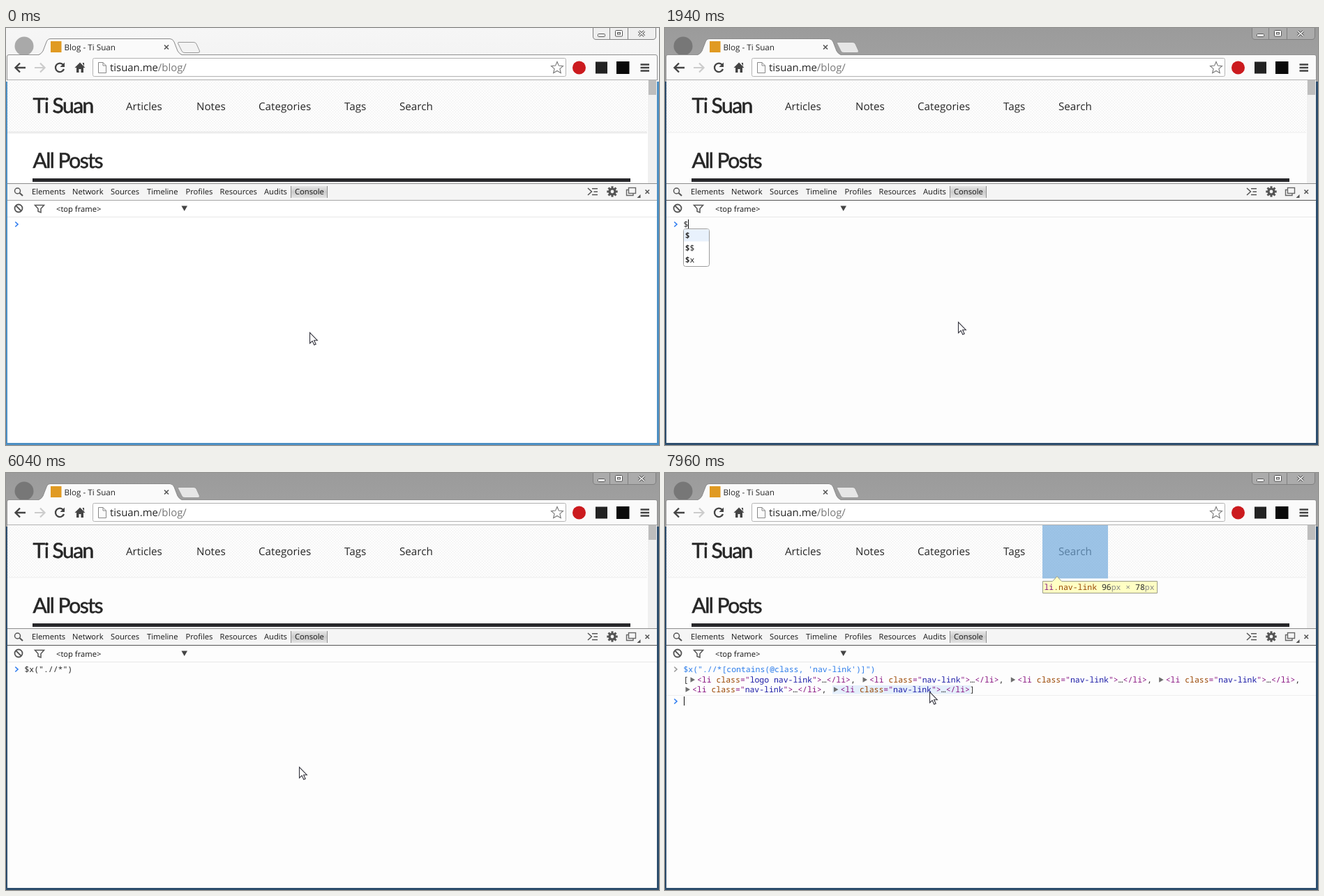
An HTML page that plays this animation: 936x599 px, repeating every 8 s.

```html
<!DOCTYPE html>
<html lang="en">
<head>
<meta charset="utf-8">
<title>Console demo</title>
<style>
html, body { margin: 0; width: 100%; height: 100%; overflow: hidden; }
svg {
  display: block; width: 100%; height: 100%;
  --bar1: #f6f6f6; --bar2: #f1f1f1; --frame: #4c8fc4; --page: #fff;
  --newtab: #f3f3f3; --badge: #a9a9a9; --rule: #a6a6a6; --btn: #efefef; --edge: 3px;
}
svg.focus {
  --bar1: #9b9b9b; --bar2: #a3a3a3; --frame: #2c4d6d; --page: #fdfdfd;
  --newtab: #e6e6e6; --badge: #777; --rule: #555; --btn: #ababab; --edge: 1px;
}
text { font-family: "Open Sans", "Noto Sans", sans-serif; fill: #262626; white-space: pre; text-rendering: geometricPrecision; }
.ui { font-size: 11.2px; fill: #161616; }
.tab { font-size: 11.7px; }
.url { font-size: 14.9px; }
.nav { font-size: 15.2px; }
.head { font: 30px Lato, "Open Sans", sans-serif; letter-spacing: -1.5px; stroke: #262626; stroke-width: .6px; }
.code { font: 11.46px "Noto Sans Mono", "DejaVu Sans Mono", monospace; }
.tag { fill: #881280; } .attr { fill: #994500; } .val { fill: #1a1aa6; } .dim { fill: #888; } .echo { fill: #2b7cea; }
.line { fill: none; stroke: #555; stroke-width: 1.5px; }
</style>
</head>
<body>
<svg id="stage" viewBox="0 0 936 599" preserveAspectRatio="none"></svg>
<script>
const svg = document.getElementById('stage');
const LOOP = 8000, CELL = 6.876;
const esc = s => s.replace(/&/g, '&amp;').replace(/</g, '&lt;');
const text = (x, y, cls, s) => `<text x="${x}" y="${y}" class="${cls}">${esc(s)}</text>`;
const rect = (x, y, w, h, fill, more = '') => `<rect x="${x}" y="${y}" width="${w}" height="${h}" fill="${fill}" ${more}/>`;
const path = (d, more = 'class="line"') => `<path d="${d}" ${more}/>`;
const solid = c => `fill="${c}"`;
const outline = (c, w = 1, fill = 'none') => `fill="${fill}" stroke="${c}" stroke-width="${w}"`;
const span = (cls, s) => `<tspan class="${cls}">${esc(s)}</tspan>`;

// One collapsed element in the console result
function node(x, y, name, tail) {
  return path(`M${x + 3.5} ${y - 7.8}l6.5 3.8l-6.5 3.8z`, solid('#6e6e6e')) +
    `<text x="${x + 13}" y="${y}" class="code">` + span('tag', '<li ') + span('attr', 'class') +
    span('tag', '="') + span('val', name) + span('tag', '">') + '…' + span('tag', '</li>') + tail + '</text>';
}

const defs = `<defs>
  <linearGradient id="bar" x2="0" y2="1"><stop stop-color="var(--bar1)"/><stop offset="1" stop-color="var(--bar2)"/></linearGradient>
  <linearGradient id="press" x2="0" y2="1"><stop stop-color="#e6e6e6"/><stop offset=".5" stop-color="#cbcbcb"/><stop offset="1" stop-color="#e3e3e3"/></linearGradient>
  <pattern id="dots" width="4" height="4" patternUnits="userSpaceOnUse">
    <rect width="4" height="4" fill="#fcfcfc"/><path d="M0 0h1v1h-1zM2 2h1v1h-1z" fill="#ebebeb"/>
  </pattern></defs>`;

const windowFrame =
  rect(0, 0, 936, 78, 'url(#bar)') + rect(0, 77, 936, 522, 'var(--frame)') +
  path('M841.5 0V12Q841.5 16.5 846 16.5H927Q931.5 16.5 931.5 12V0M865.5 0V16M891.5 0V16', outline('#7f7f7f', 1, 'var(--btn)')) +
  rect(848.5, 8.5, 10, 4, '#fff', 'rx="1" stroke="#555"') +
  rect(873.5, 3.5, 10, 8.5, '#fff', 'rx="1" stroke="#555"') + rect(876.5, 6.5, 4, 2.5, '#ddd', 'stroke="#555"') +
  path('M907 4.5L915 11.5M915 4.5L907 11.5', outline('#555', 3.4)) + path('M907 4.5L915 11.5M915 4.5L907 11.5', outline('#fff', 1.5)) +
  `<circle cx="26" cy="26" r="13.5" fill="var(--badge)"/>` +
  path('M247 20.5H269Q272 20.5 273 23L277.5 33Q278 35.5 275 35.5H256Q253 35.5 252 33L246.5 22Z', outline('#999', 1, 'var(--newtab)')) +
  rect(2, 39, 931, 36, '#fafafa') + path('M1.5 75V41Q1.5 38.5 4 38.5H931Q933.5 38.5 933.5 41V75', outline('#909090')) +
  path('M46 39Q51 37 53 33L58 20Q59.5 15.5 64 15.5H235Q239 15.5 241 20L246 33Q248 37 253 39', outline('#8a8a8a', 1, '#fafafa')) +
  rect(46, 39, 207, 2, '#fafafa') +
  rect(64, 19, 15.5, 16, '#e09a22') +
  text(83.5, 32, 'tab', 'Blog - Ti Suan') +
  path('M227 24.5L233 30.5M233 24.5L227 30.5', outline('#555', 1.6));

const toolbar =
  path('M28 57H14M20 50.5L13.5 57L20 63.5', outline('#444', 2.4)) +
  path('M41 57H55M49 50.5L55.5 57L49 63.5', outline('#ccc', 2.2)) +
  path('M82 53A6.2 6.2 0 1 0 83 59', outline('#444', 2.3)) + path('M84 49.5V56H77.5Z', solid('#444')) +
  path('M98.5 57L106 49.5L113.5 57H111V64H107.5V59H104.5V64H101V57ZM109.5 50H112V55Z', solid('#444')) +
  rect(124.5, 43.5, 678, 26, '#fff', 'rx="2" stroke="#b3b3b3"') +
  path('M132.5 49.5H139L143.5 54V64.5H132.5ZM139 49.5V54H143.5', outline('#888', 1, '#fbfbfb')) +
  `<text x="149" y="62" class="url">tisuan.me<tspan class="dim" style="fill:#777">/blog/</tspan></text>` +
  path('M790 48.5L792.4 54.1L798.5 54.7L793.9 58.7L795.3 64.7L790 61.5L784.7 64.7L786.1 58.7L781.5 54.7L787.6 54.1Z', outline('#777', 1.1, '#fff')) +
  `<circle cx="821.5" cy="57" r="9.5" fill="#cb1a1e"/>` +
  rect(845, 48.5, 17, 17, '#222') + rect(875, 48, 18.5, 18, '#0a0a0a') +
  path('M909.5 52.5H922M909.5 57H922M909.5 61.5H922', outline('#444', 2.4)) +
  path('M2 74.5H933', outline('#b0b0b0'));

const menu = [[172, 'Articles'], [273, 'Notes'], [362, 'Categories'], [485, 'Tags'], [564, 'Search']];
const page =
  rect(2, 75, 931, 521, 'var(--page)') + rect(2, 75, 917, 74, 'url(#dots)') +
  path('M2 150H919', 'fill="none" stroke="#ececec" style="stroke-width:var(--edge)"') +
  text(38.5, 121.5, 'head', 'Ti Suan') + menu.map(([x, s]) => text(x, 118, 'nav', s)).join('') +
  text(38.5, 201, 'head', 'All Posts') + rect(38, 216, 857, 5, '#28282b') +
  rect(920, 75, 13, 148, '#f0f0f0') + rect(921, 75, 11, 21, '#bdbdbd');

const panels = [[37, 'Elements'], [95, 'Network'], [150, 'Sources'], [202, 'Timeline'], [257.5, 'Profiles'],
  [306.5, 'Resources'], [370, 'Audits'], [414, 'Console']];
let gear = '';
for (let a = 0; a < 360; a += 45) gear += rect(867.5, 227.3, 3, 4, '#555', `transform="rotate(${a} 869 235)"`);
const devtools =
  rect(2, 223, 931, 25, '#f5f5f5') + path('M2 223.5H933', outline('#8c8c8c')) +
  path('M2 247.5H933', 'stroke="var(--rule)"') + path('M2 271.5H933', outline('#e8e8e8')) +
  rect(408.5, 227, 52.5, 17, 'url(#press)') + path('M408.5 227V244M460.5 227V244', outline('#8f8f8f')) +
  panels.map(([x, s]) => text(x, 239, 'ui', s)).join('') +
  `<circle cx="16.5" cy="234" r="4" class="line"/>` + path('M19.5 237L24 241', outline('#555', 2.2)) +
  `<circle cx="18" cy="259" r="5.5" class="line" style="stroke-width:1.8px"/>` + path('M14 255L22 263', outline('#555', 1.8)) +
  path('M41.5 254.5H54.5L50 259.5V265L46 263.5V259.5Z') +
  text(72, 263.5, 'ui', '<top frame>') + path('M251.5 255.5H260L255.7 263Z', solid('#444')) +
  path('M834 230L839.5 235L834 240M840 230.8H848M842.5 235.2H848M840 239.6H848') +
  gear + `<circle cx="869" cy="235" r="4" fill="none" stroke="#555" stroke-width="3.2"/>` +
  rect(892.5, 229.5, 10, 8, 'none', 'stroke="#666" stroke-width="1.4"') +
  path('M892 232.5H889.5V240.5H899V238', outline('#666', 1.4)) +
  path('M909.5 239V244H904.5Z', solid('#555')) + path('M916.5 232.5L922 238M922 232.5L916.5 238', outline('#555', 1.6));

const COMMAND = `$x(".//*[contains(@class, 'nav-link')]")`;
const chevron = (y, c) => path(`M13.3 ${y - 3.5}L17 ${y}L13.3 ${y + 3.5}`, outline(c, 1.6));
const echo = `<g id="echo">${chevron(282, '#999')}${text(26.5, 286, 'code echo', COMMAND)}</g>`;
const result = `<g id="result">
  ${rect(240, 305, 198, 12.5, '#e5effb', 'id="hover"')}${text(26.5, 301, 'code', '[')}` +
  node(33, 301, 'logo nav-link', ',') + [280, 492.3, 704.7].map(x => node(x, 301, 'nav-link', ',')).join('') +
  node(26, 315, 'nav-link', ',') + node(238.4, 315, 'nav-link', ']') +
  path('M2 319.5H933', outline('#efefef')) + '</g>';

const prompt = `<g id="prompt">${chevron(282, '#2f7df0')}${text(26.5, 286, 'code', '')}
  ${rect(27, 275, 1, 13, '#111', 'id="caret"')}</g>`;

const popup = `<g id="popup">${rect(26.5, 288.5, 37, 54, '#fff', 'rx="3" stroke="#9c9c9c"')}${rect(27, 289.5, 36, 17, '#e8f1fc')}` +
  ['', '$', 'x'].map((s, i) => `<text x="28.7" y="${302 + i * 17.7}" class="code"><tspan font-weight="700">$</tspan>${span('', s)}</text>`).join('') + '</g>';

const inspect = `<g id="inspect">${rect(541, 75, 94, 76.5, '#6fa8dc', 'opacity=".68"')}` +
  path('M541.5 155.5H555.5L562 148.5L568.5 155.5H705.5V172.5H541.5Z', outline('#9a9a86', 1, '#ffffc4')) +
  `<text x="543.5" y="168" class="code">${span('tag', 'li')}${span('attr', '.nav-link')} 96${span('dim', 'px × ')}78${span('dim', 'px')}</text></g>`;

const pointer = path('M.5 .5V16L4.1 12.6L6.8 18.3L9.2 17.2L6.6 11.7H11.3Z', 'id="pointer" fill="#fff" stroke="#33333d" stroke-width="1.1"');

svg.innerHTML = defs + windowFrame + toolbar + page + devtools + echo + result + prompt + popup + inspect + pointer;
const $ = id => document.getElementById(id);
const input = svg.querySelector('#prompt text');

// [start, text, caret column], -1 hides the caret
const typing = [
  [0, '', -1], [750, '', 0], [1190, '', -1], [1650, '$', 1], [2080, '$x', 2],
  [2490, '$x()', 4], [3010, '$x()', -1], [3450, '$x()', 3], [3710, '$x(")', 4],
  [3840, '$x("")', 5], [4110, '$x("")', 4], [4570, '$x(".")', 5], [4700, '$x("./")', 6],
  [5000, '$x(".//")', 7], [5470, '$x(".//*")', 8], [6040, '$x(".//*")', -1],
  [6290, COMMAND, 38], [6580, '', 0], [7250, '', -1], [7700, '', 0]
];
const moves = [[0, 435, 437], [140, 421, 424], [320, 420, 422], [7410, 371, 358], [7550, 368, 351],
  [7700, 373, 328], [7830, 378, 317], [7960, 379, 314]];
const at = (steps, t) => steps.filter(s => s[0] <= t).pop();
const show = (id, on) => $(id).setAttribute('display', on ? 'inline' : 'none');

function draw(t) {
  const [, line, col] = at(typing, t);
  const [, x, y] = at(moves, t);
  svg.classList.toggle('focus', t >= 600);
  input.textContent = line;
  show('caret', col >= 0);
  $('caret').setAttribute('x', Math.floor(27 + CELL * col));
  $('prompt').setAttribute('transform', `translate(0 ${t < 6580 ? 0 : t < 6730 ? 32 : 46})`);
  show('popup', t >= 1940 && t < 2080);
  show('echo', t >= 6580);
  show('result', t >= 6730);
  show('hover', t >= 7830);
  show('inspect', t >= 7830);
  $('pointer').setAttribute('transform', `translate(${x} ${y})`);
}

const start = performance.now();
function tick() {
  draw((performance.now() - start) % LOOP);
  requestAnimationFrame(tick);
}
tick();
</script>
</body>
</html>
```
